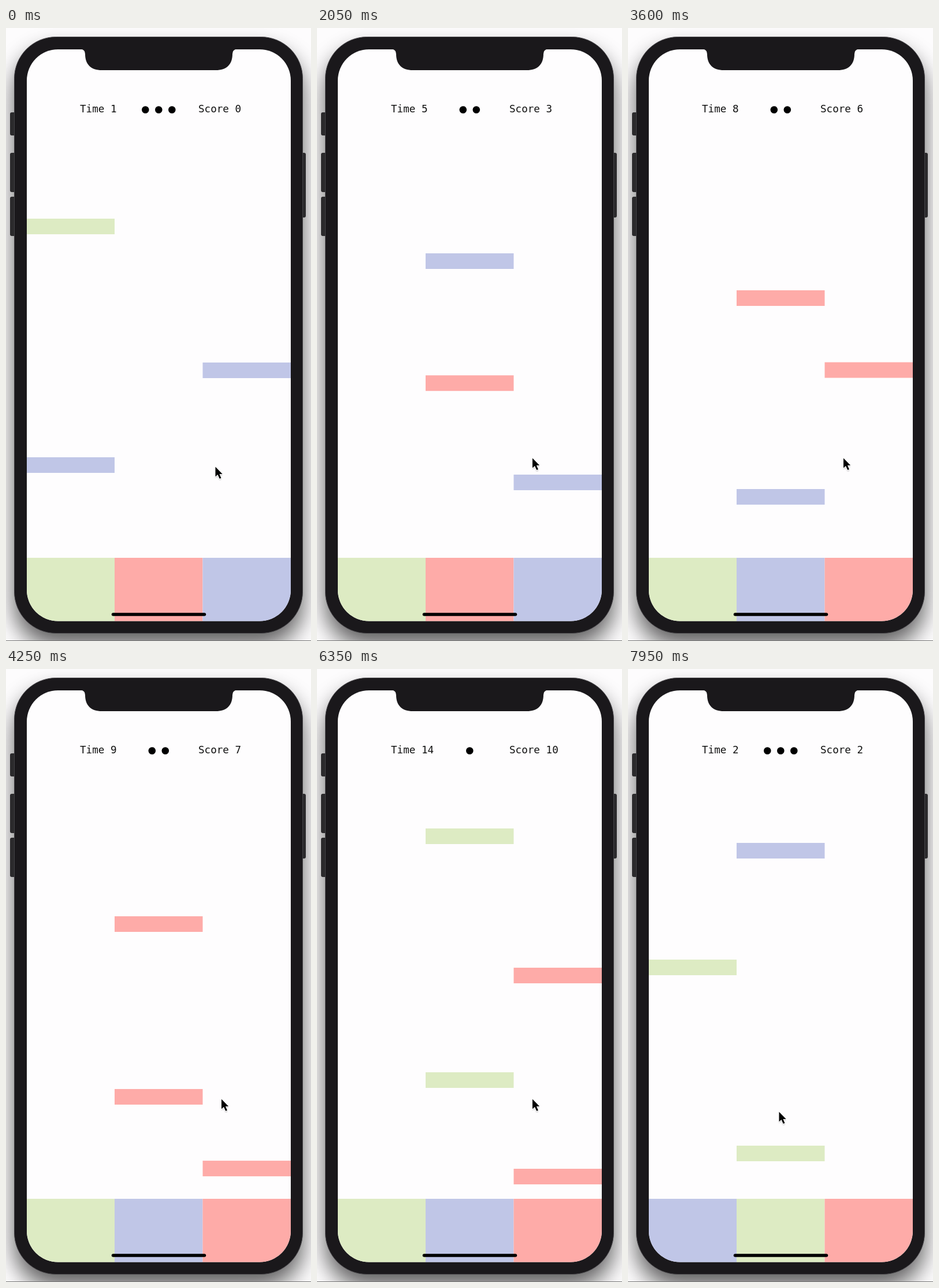
Write an HTML page that moves like this. It is 528 px wide and 1061 px high and loops after 8 s.

```html
<!DOCTYPE html>
<html lang="en">
<head>
<meta charset="utf-8">
<title>Falling bars</title>
<style>
  html, body { margin: 0; width: 100%; height: 100%; overflow: hidden; background: #fdfcfd; }
  svg { display: block; width: 100vw; height: 100vh; }
  text { font: 17.6px "DejaVu Sans Mono", monospace; fill: #111; }
</style>
</head>
<body>
<svg viewBox="0 0 528 1061">
  <defs>
    <filter id="blur" x="-20%" y="-20%" width="140%" height="140%"><feGaussianBlur stdDeviation="19"/></filter>
    <filter id="soft" x="-50%" y="-50%" width="200%" height="200%"><feGaussianBlur stdDeviation="1.2"/></filter>
    <clipPath id="screen"><rect x="36" y="37" width="457" height="989.5" rx="54"/></clipPath>
    <path id="arrow" d="M0 0V17L4 13.4 7.2 20.6 10 19.4 7 12.4H12.2Z"/>
  </defs>

  <rect x="14" y="38" width="500" height="1032" rx="72" opacity=".62" filter="url(#blur)"/>
  <rect y="1060" width="528" height="1" fill="#777"/>
  <g fill="#2b2a2c">
    <rect x="7" y="146" width="12" height="40" rx="3"/>
    <rect x="7" y="216" width="12" height="68" rx="3"/>
    <rect x="7" y="292" width="12" height="68" rx="3"/>
    <rect x="507" y="216" width="12" height="112" rx="3"/>
  </g>
  <rect x="14.5" y="15.5" width="499" height="1032" rx="72" fill="#1a181b" stroke="#444246"/>

  <g clip-path="url(#screen)">
    <rect x="36" y="37" width="457" height="990" fill="#fefdfe"/>
    <g id="bars"></g>
    <g id="bases"></g>
  </g>
  <path d="M129 36.5Q137 37 137 45C137 63 147 73 166 73H363C382 73 392 63 392 45Q392 37 400 36.5Z" fill="#1a181b"/>
  <path d="M185.5 1015H343.5" stroke="#000" stroke-width="5.5" stroke-linecap="round"/>

  <text id="time" x="128" y="146"></text>
  <text id="score" x="333" y="146"></text>
  <g id="dots"></g>

  <g id="cursor">
    <use href="#arrow" y="2" opacity=".4" filter="url(#soft)"/>
    <use href="#arrow" stroke="#fff" stroke-width="2.4" stroke-linejoin="round"/>
    <use href="#arrow"/>
  </g>
</svg>

<script>
const LOOP = 8000, STEP = 50, SECOND = 500;
const SPAWN_Y = 240, FLOOR_Y = 890, FALL = 0.42;
const GAME_OVER = 6450, RESTART = 6750;
const COLORS = { G: '#ddebc3', R: '#feaba8', B: '#c0c6e7' };
const COLUMNS = [36, 188, 340.5, 493];

// color, column, moment, height at that moment, speed in px/ms
const BARS = [
  ['B', 0, 0, 743], ['B', 2, 0, 579], ['G', 0, 0, 330, 0.4357],
  ['B', 2, 1150, 665], ['B', 2, 1150, 395], ['R', 1, 1190, 240],
  ['B', 1, 2900, 747], ['B', 1, 2900, 504], ['R', 2, 2900, 285, 0.4193],
  ['R', 1, 4250, 727], ['R', 1, 4250, 428, 0.4143],
  ['R', 2, 5300, 725, 0.47], ['R', 2, 5300, 449, 0.3962], ['G', 1, 5300, 250, 0.4267],
  ['R', 2, 6350, 517], ['G', 1, 6350, 276, 0.4223],
  ['G', 0, 7650, 503], ['B', 1, 7650, 301],
];
// Hard changes: [start, value]
const BASES = [[0, 'GRB'], [2800, 'GBR'], [4900, 'GRB'], [5500, 'GBR'],
               [7000, 'BGR'], [7350, 'GBR'], [7750, 'BGR']];
const LIVES = [[0, 3], [400, 2], [4650, 1], [RESTART, 3]];
const SCORES = [[0, 0], [750, 1], [1300, 2], [1700, 3], [2350, 4], [2750, 5], [3250, 6],
                [3850, 7], [4350, 8], [5400, 9], [5700, 10], [RESTART, 0], [7100, 1], [7550, 2]];

const $ = id => document.getElementById(id);
const valueAt = (steps, t) => steps.filter(([start]) => start <= t).pop()[1];
const progress = (t, from, to) => Math.min(1, Math.max(0, (t - from) / (to - from)));
const block = (color, column, y, height) =>
  `<rect x="${COLUMNS[column]}" y="${y}" width="${COLUMNS[column + 1] - COLUMNS[column]}" height="${height}" fill="${COLORS[color]}"/>`;

function seconds(t) {
  if (t >= RESTART) return Math.floor((t - RESTART) / SECOND);
  return Math.floor(Math.min(t, GAME_OVER) / SECOND + 1.45);
}

function cursorAt(t) {
  const a = progress(t, 100, 400), b = progress(t, GAME_OVER, RESTART);
  return [362.5 + 10.5 * a - 111.5 * b, 759.5 - 15 * a + 22 * b];
}

function draw(t) {
  // Bars stand still between the end of one round and the next.
  const played = t < GAME_OVER ? t : Math.max(GAME_OVER, t - (RESTART - GAME_OVER));
  $('bars').innerHTML = BARS.map(([color, column, moment, height, speed = FALL]) => {
    const y = height + (played - moment) * speed;
    return y >= SPAWN_Y && y < FLOOR_Y ? block(color, column, y, 27) : '';
  }).join('');
  $('bases').innerHTML = [...valueAt(BASES, t)].map((color, i) => block(color, i, 917, 110)).join('');

  const lives = valueAt(LIVES, t);
  $('dots').innerHTML = Array.from({ length: lives }, (_, i) =>
    `<circle cx="${264.3 + 23 * (i - (lives - 1) / 2)}" cy="141.5" r="6.3"/>`).join('');
  $('time').textContent = `Time ${seconds(t)}`;
  $('score').textContent = `Score ${valueAt(SCORES, t)}`;
  $('cursor').setAttribute('transform', `translate(${cursorAt(t)})`);
}

const begin = performance.now();
function frame() {
  const t = (performance.now() - begin) % LOOP;
  draw(Math.floor(t / STEP) * STEP);
  requestAnimationFrame(frame);
}
frame();
</script>
</body>
</html>
```
